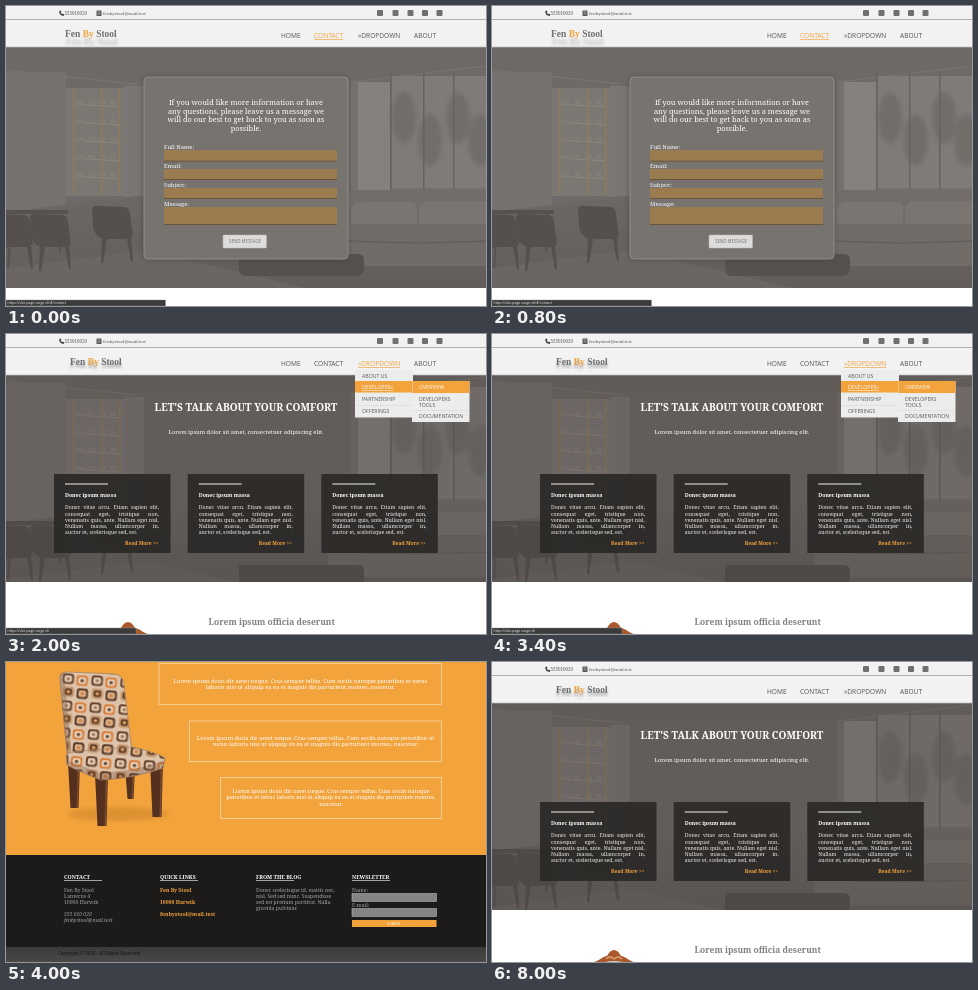
An HTML page that plays this animation: 480 by 300 pixels, repeating every 9.99 s.

```html
<!DOCTYPE html>
<html lang="en">
<head>
<meta charset="utf-8">
<title>Furniture shop tour</title>
<style>
html, body { margin: 0; width: 100%; height: 100%; overflow: hidden; background: #fff; }
svg { display: block; width: 100%; height: 100%; }
text, .card { font-family: "Noto Serif", "Liberation Serif", serif; }
.sans { font-family: "Open Sans", "Noto Sans", sans-serif; }
.logo { font: bold 9.5px "Liberation Serif", serif; }
.b { font-weight: bold; }
.i { font-style: italic; }
.m { text-anchor: middle; }
.u { text-decoration: underline; }
.card { font-size: 5.15px; line-height: 6.2px; color: #f0eeec; }
.card div { white-space: nowrap; text-align: justify; text-align-last: justify; }
.card div:last-child { text-align-last: left; }
</style>
</head>
<body>
<svg id="stage" viewBox="0 0 480 300"></svg>
<script>
const ORANGE = '#f2a33c', GREY = '#707070';
const BRAND = 'Fen By Stool', MAIL = 'fenbystool@mail.test', TOWN = '10000 Harwik';

const text = (x, y, size, str, fill = '#fff', cls = '') =>
  `<text x="${x}" y="${y}" font-size="${size}" fill="${fill}" class="${cls}">${str}</text>`;
const rect = (x, y, w, h, fill, more = '') =>
  `<rect x="${x}" y="${y}" width="${w}" height="${h}" fill="${fill}" ${more}/>`;
const path = (d, fill, more = '') => `<path d="${d}" fill="${fill}" ${more}/>`;
const line = (d, color, width = 1) => path(d, 'none', `stroke="${color}" stroke-width="${width}"`);
const lines = (x, y, step, size, rows, fill, cls) =>
  rows.map((row, i) => text(x, y + i * step, size, row, fill, cls)).join('');
const each = (list, draw) => list.map(draw).join('');
const group = (body, more) => `<g ${more}>${body}</g>`;

const defs = `<defs>
  <pattern id="weave" width="3" height="3" patternUnits="userSpaceOnUse">
    ${rect(0, 0, 3, 3, '#d6d8db')}<circle cx="1.5" cy="1.5" r=".6" fill="#c8cace"/></pattern>
  <pattern id="retro" width="29" height="27" patternUnits="userSpaceOnUse" patternTransform="translate(56 10) rotate(4)">
    ${rect(0, 0, 29, 27, '#dcc3aa')}
    ${each([[1, 1, '#6b4630', '#e6d2bc', '#a5795a'], [15, 2, '#d9803f', '#e8d6c2', '#6b4630'],
            [2, 14, '#c99a72', '#5a3a28', '#e8a05c'], [16, 15, '#5f3d2a', '#d8b794', '#d9803f']],
      ([x, y, a, b, c]) => rect(x, y, 11.5, 10.5, a, 'rx="3"') + rect(x + 2, y + 2, 7.5, 6.5, b, 'rx="2"') +
        rect(x + 4, y + 3.7, 3.5, 3, c, 'rx="1"'))}
  </pattern>
  <linearGradient id="floor" x2="0" y2="1"><stop stop-color="#6d6865"/><stop offset="1" stop-color="#625d5a"/></linearGradient>
  <linearGradient id="strip" x2="0" y2="1"><stop stop-color="#3c3a39"/><stop offset="1" stop-color="#4b4948"/></linearGradient>
  <linearGradient id="fade" x2="0" y2="1"><stop stop-color="#fff" stop-opacity=".7"/><stop offset="1" stop-color="#fff"/></linearGradient>
  <filter id="soft"><feGaussianBlur stdDeviation="2"/></filter>
  <clipPath id="hero"><rect y="41" width="480" height="207"/></clipPath>
</defs>`;

function room() {
  const chair = (x, y) => path(`M${x} ${y}q2 -3 8 -2l24 1q5 0 6 6l3 24h-2l2 24h-2l-4 -22h-20l-4 24h-2l1 -25q-8 -2 -9 -12z`, '#55504d');
  return rect(0, 41, 480, 241, '#6f6a67') +
    path('M0 41H480V62L345 76H130L0 64z', '#6d6966') +
    line('M0 64L130 78M345 76L480 60', '#7d7976', .8) +
    rect(0, 66, 60, 138, '#76726f') +
    rect(60, 82, 58, 108, '#7b7773') + rect(118, 80, 20, 112, '#7a7673') +
    each([98, 116, 134, 152, 170], y => line(`M67 ${y}L114 ${y + 3}`, '#908679', 1.2) +
      each([71, 82, 94, 104], x => rect(x, y - 3, 6, 4, '#827c77'))) +
    each([67, 95, 113], x => rect(x, 82, 1.3, 106, '#927a58')) +
    rect(345, 76, 135, 124, '#75716e') +
    rect(352, 76, 32, 114, '#85817d') + rect(386, 70, 94, 112, '#7f7b78') +
    group(each([398, 424, 452, 474], (x, i) => `<ellipse cx="${x}" cy="${112 + i % 2 * 22}" rx="12" ry="26" fill="#716e6a"/>`), 'filter="url(#soft)"') +
    each([384, 417, 447], x => rect(x, 66, 1.5, 118, '#66625f')) +
    path('M0 206L130 190H345L480 200V282H0z', 'url(#floor)') +
    path('M0 262L140 244L300 282H0z', '#6b6663') +
    path('M330 192q0 -8 10 -8H480V236H330z', '#726d6a') +
    path('M345 204q2 -8 12 -8h46q8 0 8 8v20h-66zM413 202q2 -7 10 -7H480V224H413z', '#7a7571') +
    path('M322 224q2 -6 12 -6H480V260H336q-14 0 -14 -8z', '#716c68') +
    line('M324 234q80 5 156 1', '#645f5c', 1.3) +
    path('M233 248H352q6 0 6 6v9q0 7 -8 7H240q-7 0 -7 -7z', '#56514e') +
    path('M0 204H62V208H0z', '#57524f') + line('M6 208L2 262M56 208L54 246', '#57524f', 2) +
    chair(24, 210) + chair(86, 202) + chair(-14, 210);
}

function header(active, logoX, shadow) {
  const nav = [['HOME', 275], ['CONTACT', 308], ['»DROPDOWN', 352], ['ABOUT', 408]];
  const [a, b, c] = BRAND.split(' ');
  return rect(0, 0, 480, 41, '#f2f2f2') + rect(0, 13, 480, .9, '#a9a9a9') + rect(0, 40.5, 480, .8, '#ccc') +
    path('M53.3 5l1.3 -.6l.9 1.6l-.7 .7l1.4 1.5l.9 -.6l1.3 1.2l-.9 1.2q-4.6 -.6 -4.2 -5z', '#444') +
    text(58.5, 9, 4.5, '555010020', '#555') +
    rect(90.5, 4.5, 5, 5.5, '#555', 'rx=".6"') + line('M91.5 6H94.5M91.5 8H94.5', '#ddd', .6) +
    text(97, 9, 4.3, MAIL, '#555') +
    each([371, 386.5, 401.5, 416, 430.5], x => rect(x, 4, 6, 6, GREY, 'rx="1"')) +
    group(text(logoX, 31, 9.5, `${a} <tspan fill="${ORANGE}">${b}</tspan> ${c}`, GREY, 'logo'),
      `style="filter:drop-shadow(${shadow})"`) +
    each(nav, ([name, x]) => text(x, 32, 6.6, name, name === active ? ORANGE : '#555', 'sans' + (name === active ? ' u' : '')));
}

function status(width, url) {
  return rect(0, 294, width, 6, '#3b3b3b', 'stroke="#888" stroke-width=".4"') + text(1.5, 298.3, 3.5, url, '#eee', 'sans');
}

function contact() {
  const fields = [['Full Name:', 144, 11.5], ['Email:', 163, 11], ['Subject:', 182, 11], ['Message:', 201, 18]];
  return room() + header('CONTACT', 59, '1px 8px 1.5px #c4c4c4') +
    rect(136.5, 70, 206, 184.5, '#45403d', 'rx="6" opacity=".5" filter="url(#soft)"') +
    rect(138, 71, 204, 182, '#77736f', 'rx="4" stroke="#918d8a"') +
    lines(240, 99, 8.65, 7.45, ['If you would like more information or have', 'any questions, please leave us a message we',
      'will do our best to get back to you as soon as', 'possible.'], '#fff', 'm') +
    each(fields, ([name, y, h]) => rect(158, y, 173, h, '#9b7c51') + rect(158, y + h - .8, 173, .8, '#5b4a34') +
      text(158, y - 1.2, 5.8, name)) +
    rect(217, 229, 43.5, 13, '#dedcda', 'rx="1" stroke="#bbb" stroke-width=".5"') +
    text(239, 237.2, 4.4, 'SEND MESSAGE', GREY, 'sans m') +
    status(159.5, 'https://site-page.surge.sh/#/contact');
}

function card(x) {
  const rows = ['Donec vitae arcu. Etiam sapien elit,', 'consequat eget, tristique non,', 'venenatis quis, ante. Nullam eget nisl.',
    'Nullam massa, ullamcorper in,', 'auctor et, scelerisque sed, est.'];
  return rect(x, 140, 116.5, 79, '#2b2927', 'opacity=".92"') + rect(x + 11, 149.3, 43, 1.4, '#bbb8b5') +
    text(x + 11, 163, 5.15, 'Donec ipsum massa', '#fff', 'b') +
    `<foreignObject x="${x + 11}" y="170.3" width="94" height="34"><div class="card">${each(rows, r => `<div>${r}</div>`)}</div></foreignObject>` +
    text(x + 71, 211, 4.9, 'Read More &gt;&gt;', ORANGE, 'b');
}

function armchair() {
  const wood = '#a9592c', cloth = 'url(#weave)';
  // The right arm is the left one mirrored about x = 122.
  const arm = path('M70 178Q73 150 68 132Q66 114 80 111Q91 112 94 128L97 178z', cloth) +
    line('M93 119q5 14 2 32', '#b2b4b9') +
    line('M93 150q-9 -1 -13 5q-6 10 -4 27', wood, 2.6) +
    path('M70 176h10q4 8 14 9l-1 4q-11 0 -16 4q-2 5 -1 11h-6q-3 -14 0 -28z', wood);
  const body = path('M93 162C93 138 85 124 87 109C89 97 101 99 108 94Q122 85 136 94C143 99 155 97 157 109C159 124 151 138 151 162z',
      cloth, `stroke="${wood}" stroke-width="3"`) +
    rect(80, 165, 84, 20, cloth) +
    arm + group(arm, 'transform="translate(244 0) scale(-1 1)"') +
    path('M90 156q32 -9 64 0q6 10 0 16q-32 5 -64 0q-6 -6 0 -16z', cloth) +
    line('M90 157q32 -8 64 0M89 172q33 6 66 0', '#b4b7bc', .9) +
    path('M80 182q20 6 32 4q10 -5 20 0q12 2 32 -4v5q-18 6 -32 5q-10 5 -20 0q-14 1 -32 -5z', wood) +
    path('M104 98q4 -8 11 -9q3 -6 7 -6t7 6q7 1 11 9q-18 -8 -36 0z', wood) +
    line('M114 92q4 -4 8 0q4 -4 8 0M113 189q9 -4 18 0', '#dca06c', 1.2);
  return group(body, 'transform="translate(0 408) scale(1 -1)" opacity=".3"') +
    rect(60, 204, 126, 42, 'url(#fade)') + body;
}

function about() {
  const col = ['Duis aute irure dolor inss reprehenderit', 'in voluptate velit esse cillum fugiat nulla', 'pariatur. Excepteur sint excepteur sint',
    'occaecat cupidatat non proident, sunt in', 'culpa quimollit officia deserunt dolore', 'amet enim id est laborum. Lorem ipsum.'];
  return rect(0, 43, 480, 204, '#fff') + armchair() +
    text(202.5, 86, 8.45, 'Lorem ipsum officia deserunt', '#808080', 'b') +
    lines(202.5, 106, 6.68, 5.53, ['Lorem ipsum dolor sit amet, consectetur adipiscing elit, sed do eiusmod tempor',
      'incididunt ut labore et dolore magna aliqua. Ut enim ad minim veniam, quis',
      'nostrud exercitation ullamco laboris nisi ut aliquip ex ea commodo consequat.',
      'Duis aute irure dolor in reprehenderit in voluptate velit esse cillum dolore eu',
      'fugiat nulla pariatur. Excepteur sint occaecat cupidatat non proident, sunt in',
      'culpa qui officia deserunt mollit anim id est laborum. Lorem ipsum dolor sit',
      'amet enim. Etiam ullamcorper. Suspendisse a pellentesque dui, non',
      'felis. Maecenas malesuada elit lectus felis, malesuada ultricies. Curabitur et ligula.',
      'Ut molestie a, ultricies porta urna.'], '#666') +
    each([[202.5, 'Duis aute'], [320, 'Excepteur sint']], ([x, title]) =>
      text(x, 174.5, 5.2, title, ORANGE, 'b') + lines(x, 186.5, 6.15, 5.2, col, '#6c6c6c')) +
    rect(0, 247, 480, 60, ORANGE) + text(250, 292, 7.2, 'LOREM IPSUM OFFICIA DESERUNT', '#fff', 'b m');
}

function home(active) {
  return group(group(room(), 'transform="translate(0 -17)"') + rect(0, 41, 480, 207, '#36312e', 'opacity=".22"'), 'clip-path="url(#hero)"') +
    header(active, 64, '0 3px .8px #aaa') +
    text(240, 77, 10, "LET'S TALK ABOUT YOUR COMFORT", '#fff', 'b m') +
    text(240, 100, 5.75, 'Lorem ipsum dolor sit amet, consectetuer adipiscing elit.', '#fff', 'm') +
    each([48, 181.7, 315.3], card) +
    group(about(), 'transform="translate(0 205)"');
}

function menu() {
  const item = (x, y, name, fill = '#555', cls = '') => text(x, y, 5.2, name, fill, 'sans ' + cls);
  return rect(349, 36, 58, 47.5, '#ececec') + rect(406, 47, 57.5, 41, '#ececec') +
    rect(349, 47, 57.5, 11.5, ORANGE) + rect(406.5, 47, 57, 12, ORANGE) +
    rect(349, 71, 57, .4, '#ccc') + rect(406.5, 76, 57, .4, '#ccc') + rect(406.2, 47, .5, 12, '#f7c98a') +
    item(356, 43.5, 'ABOUT US') + item(356, 55, 'DEVELOPER»', '#fff', 'u') + item(356, 67, 'PARTNERSHIP') +
    item(356, 78.7, 'OFFERINGS') + item(413, 55, 'OVERVIEW', '#fff') + item(413, 67, 'DEVELOPERS') +
    item(413, 72.5, 'TOOLS') + item(413, 84, 'DOCUMENTATION') + status(130, 'https://site-page.surge.sh');
}

function sideChair() {
  const leg = (x, y, w, h) => path(`M${x} ${y}h${w}l-1.5 ${h}h${4 - w}z`, '#55301f') + line(`M${x + w - 1.5} ${y}l-1.2 ${h}`, '#7a4a30', 1.5);
  return `<ellipse cx="112" cy="152" rx="50" ry="7" fill="#b87522" opacity=".35" filter="url(#soft)"/>` +
    leg(62, 100, 12, 46) + leg(119, 105, 10, 32) +
    path('M54 20Q52 10 62 10L108 12Q117 13 118 22L126 90L62 98z', 'url(#retro)', 'stroke="#a98465" stroke-width=".8"') +
    path('M54 20Q52 10 58 10L66 96L61 98z', '#8a6a52', 'opacity=".45"') +
    leg(89, 112, 13, 52) + leg(144, 100, 13, 55) +
    path('M60 94Q62 90 74 89L126 85Q150 90 159 96L157 106Q130 116 95 118Q74 110 61 103z', 'url(#retro)', 'stroke="#a98465" stroke-width=".8"') +
    path('M61 98Q76 104 95 111Q130 109 159 98L157 106Q130 116 95 118Q74 110 61 103z', '#6d4a35', 'opacity=".3"');
}

function footer() {
  const start = 'Lorem ipsum dosis dir amet neque. Cras semper tellus. Cum sociis natoque';
  const end = 'laboris nisi ut aliquip ex ea et magnis dis parturient montes,';
  const boxes = [[153, 1.5, 41, [start + ' penatibus et netus', end + ' nascetur.']],
    [183.5, 59, 40.5, [start + ' penatibus et', 'netus ' + end + ' nascetur.']],
    [214.5, 115.5, 41, [start, 'penatibus et netus ' + end, 'nascetur.']]];
  const titles = [[58, 'CONTACT'], [154, 'QUICK LINKS'], [250, 'FROM THE BLOG'], [346, 'NEWSLETTER']];
  const grey = '#a5a3a1';
  return rect(0, 0, 480, 193, ORANGE) + sideChair() +
    each(boxes, ([x, y, h, rows]) => rect(x, y, 435.5 - x, h, 'none', 'stroke="#f9d7a6" stroke-width=".8"') +
      lines((x + 435.5) / 2, y + (rows.length > 2 ? 15.5 : 19), 6.3, rows.length > 2 ? 5.55 : 5.7, rows, '#fff', 'm')) +
    rect(0, 193, 480, 92, '#1c1b1a') + rect(0, 285, 480, 15, 'url(#strip)') +
    each(titles, ([x, name]) => text(x, 217, 5.3, name, '#fff', 'b') + rect(x, 218.3, 38, .7, '#ddd')) +
    lines(58, 230, 6.1, 5.15, [BRAND, 'Lanterns 4', TOWN], grey) +
    lines(58, 254, 6.1, 5, ['555 010 020', MAIL], grey, 'i') +
    lines(154, 230, 12.1, 5.15, [BRAND, TOWN, MAIL], ORANGE, 'b') +
    lines(250, 230, 6.1, 5.1, ['Donec scelerisque id, mattis nec,', 'nisl. Sed sed nunc. Suspendisse', 'sed est pretium porttitor. Nulla', 'gravida pulvinar.'], grey) +
    text(346, 230, 5.15, 'Name:', grey) + text(346, 245, 5.15, 'E-mail:', grey) +
    each([231.5, 246.5], y => rect(346, y, 84.5, 8, '#858483', 'stroke="#b5b4b3" stroke-width=".6"')) +
    rect(346, 258, 84.5, 7, ORANGE) + text(388, 263, 3.7, 'SUBMIT', '#fff', 'sans m') +
    text(52, 293.3, 4.5, 'Copyright © 2018 - All Rights Reserved', '#171615');
}

// Each scene with the time at which it ends.
const scenes = [
  [2000, contact()],
  [4000, home('»DROPDOWN') + menu()],
  [6000, footer()],
  [8000, group(home(), 'transform="translate(0 -205)"')],
  [9990, home()]
];
const stage = document.getElementById('stage');
stage.innerHTML = defs + each(scenes, ([, body]) => group(body, 'class="scene"'));
const views = [...stage.querySelectorAll('.scene')];

function frame() {
  const t = performance.now() % 9990;
  const now = scenes.findIndex(([until]) => t < until);
  views.forEach((view, i) => view.style.display = i === now ? '' : 'none');
  requestAnimationFrame(frame);
}
frame();
</script>
</body>
</html>
```
